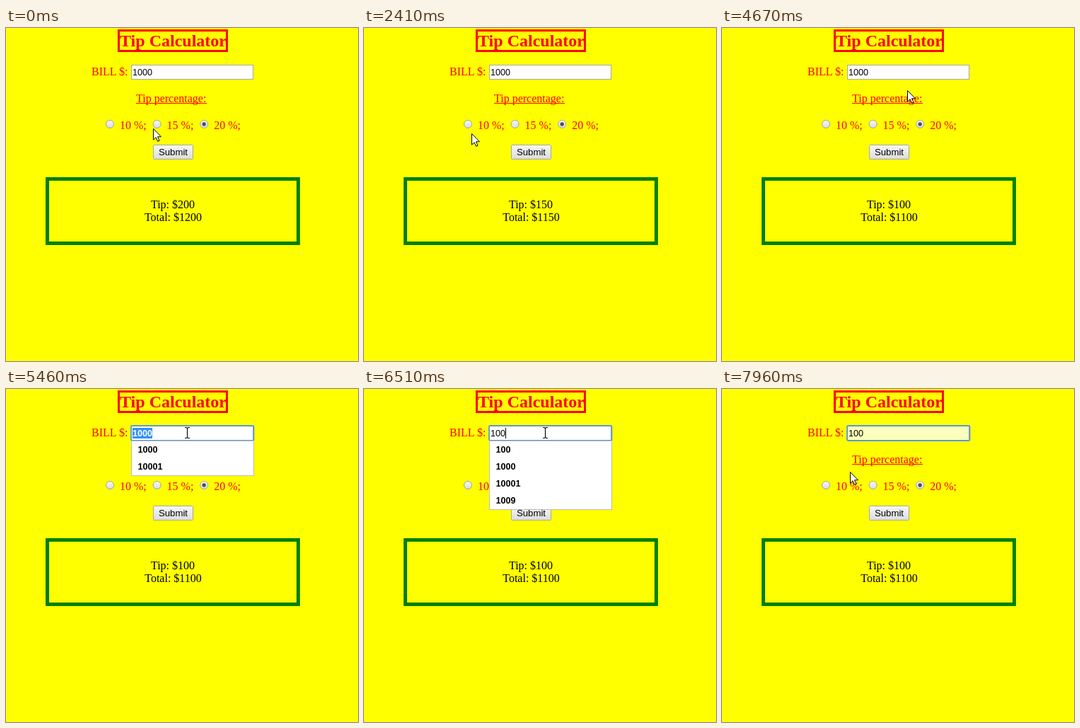
An HTML page for the animation above (8 s loop, 498 by 471 pixels).

```html
<!DOCTYPE html>
<html lang="en">
<head>
<meta charset="utf-8">
<title>Tip Calculator</title>
<style>
  html, body { margin: 0; width: 100%; height: 100%; overflow: hidden; background: #ff0; }
  svg { display: block; }
  .serif { font: 16px "Liberation Serif", serif; }
  .sans { font: 12.6px "Liberation Sans", sans-serif; }
  .red { fill: #f00; }
  .hidden { display: none; }
  #title { font-size: 24px; font-weight: bold; }
  #options text { font-weight: bold; }
</style>
</head>
<body>
<svg width="498" height="471" viewBox="0 0 498 471">
  <defs>
    <linearGradient id="face" x2="0" y2="1">
      <stop stop-color="#f8f8f8"/><stop offset="1" stop-color="#dcdcdc"/>
    </linearGradient>
    <linearGradient id="pressed" x2="0" y2="1">
      <stop stop-color="#dedede"/><stop offset="1" stop-color="#efefef"/>
    </linearGradient>
  </defs>
  <rect width="498" height="471" fill="#ff0"/>

  <g class="serif red">
    <rect x="159.5" y="3.5" width="153" height="29" fill="none" stroke="#f00" stroke-width="3"/>
    <text id="title" x="236.5" y="26" text-anchor="middle">Tip Calculator</text>
    <text x="121" y="67">BILL $:</text>
    <text x="184" y="105">Tip percentage:</text>
    <rect x="184" y="106" width="100" height="1"/>
    <g id="radios"></g>
  </g>

  <rect id="button" x="208.5" y="165.5" width="56" height="20" rx="1" stroke="#a6a6a6"/>
  <text class="sans" x="236.5" y="180" text-anchor="middle" style="font-size:13.2px">Submit</text>

  <rect x="58.5" y="213.5" width="355" height="91" fill="none" stroke="#008000" stroke-width="5"/>
  <g class="serif" text-anchor="middle">
    <text id="tip" x="236" y="255"></text>
    <text id="total" x="236.5" y="273"></text>
  </g>

  <rect id="field" x="177.5" y="52.5" width="172" height="20" stroke="#a9a9a9"/>
  <rect id="ring" x="177" y="52" width="173.5" height="21" rx="1.5" fill="none" stroke="#5c9ad2" stroke-width="1.8"/>
  <rect id="selection" x="179" y="55" width="28" height="15" fill="#3390ff"/>
  <text id="value" class="sans" x="179" y="67"></text>
  <rect id="caret" y="55" width="1" height="15"/>

  <g id="options" class="sans"></g>

  <path id="arrow" d="M.5 .5V16.2L4.1 12.8L6.6 18.3L9 17.3L6.5 11.8H11.4Z" fill="#fff" stroke="#000"/>
  <path id="beam" d="M-3.5 -7.5H-1.5L0 -6.5L1.5 -7.5H3.5M0 -6.5V6.5M-3.5 7.5H-1.5L0 6.5L1.5 7.5H3.5" fill="none" stroke="#000" stroke-width="1.1"/>
</svg>
<script>
const LOOP = 8000;
const RATES = [10, 15, 20];
const DIGIT = 7;
const $ = id => document.getElementById(id);

const at = (x, y) => ({ x, y });
const history = ["100", "1000", "10001", "1009"];
const typed = (value, options) => ({ value, options, selected: false, caret: true });
const result = tip => ({ tip, rate: 20, button: "face" });

const start = {
  x: 208, y: 142, beam: false, rate: 20, tip: 200, button: "face", value: "1000",
  focus: false, selected: false, caret: false, filled: false, options: [], hover: false
};

// Each entry changes part of the state from its time onwards.
const timeline = [
  [140, at(211, 140)],
  [270, at(213, 139)],
  [590, { rate: 15 }],
  [710, at(214, 145)],
  [830, at(217, 158)],
  [950, at(219, 169)],
  [1090, at(222, 174)],
  [1230, at(223, 176)],
  [1390, { button: "pressed" }],
  [1670, result(150)],
  [2170, at(214, 174)],
  [2290, at(182, 163)],
  [2410, at(152, 149)],
  [2540, at(134, 141)],
  [2660, at(141, 138)],
  [2780, at(146, 136)],
  [3180, { rate: 10 }],
  [3330, at(186, 171)],
  [3450, at(204, 179)],
  [3580, at(214, 179)],
  [3710, at(218, 177)],
  [3830, at(220, 176)],
  [3980, { button: "pressed" }],
  [4130, { button: "face" }],
  [4280, result(100)],
  [4420, at(236, 152)],
  [4540, at(264, 108)],
  [4670, at(262, 88)],
  [4790, at(255, 85)],
  [4930, { ...at(256.5, 65), beam: true }],
  [5060, at(256.5, 62)],
  [5310, { focus: true, caret: true }],
  [5460, { selected: true, caret: false, options: history.slice(1, 3) }],
  [6240, typed("1", [...history, "12", "15"])],
  [6380, typed("10", history)],
  [6510, typed("100", history)],
  [7060, { ...at(222, 88), beam: false, caret: false, filled: true, hover: true }],
  [7210, at(223, 89)],
  [7340, at(224, 90)],
  [7590, { options: [], hover: false }],
  [7710, at(212, 98)],
  [7840, at(190, 110)],
  [7960, at(181, 117)]
];

$("radios").innerHTML = RATES.map((rate, i) => {
  const cx = 147 + i * 66.6;
  return `<circle cx="${cx}" cy="136" r="5.5" fill="url(#face)" stroke="#a3a3a3"/>
    <circle class="dot" cx="${cx}" cy="136" r="2.7" fill="#505050"/>
    <text x="${cx + 14}" y="143">${rate} %;</text>`;
}).join("");
const dots = document.querySelectorAll(".dot");

const show = (node, visible) => node.classList.toggle("hidden", !visible);

function optionList({ options, hover }) {
  if (!options.length) return "";
  const rows = options.map((text, i) => `<text x="186.5" y="${90 + i * 24}">${text}</text>`);
  const mark = hover ? '<rect x="178" y="74" width="172" height="24" fill="#cdcdcd"/>' : "";
  return `<rect x="177.5" y="73.5" width="173" height="${options.length * 24 + 1}" fill="#fff" stroke="#bdbdbd"/>`
    + mark + rows.join("");
}

function draw(s) {
  dots.forEach((dot, i) => show(dot, RATES[i] === s.rate));
  $("tip").textContent = `Tip: $${s.tip}`;
  $("total").textContent = `Total: $${1000 + s.tip}`;
  $("button").setAttribute("fill", `url(#${s.button})`);
  $("field").setAttribute("fill", s.filled ? "#faffbd" : "#fff");
  show($("ring"), s.focus);
  show($("selection"), s.selected);
  $("value").textContent = s.value;
  $("value").style.fill = s.selected ? "#fff" : "#000";
  $("value").style.fontWeight = s.selected ? "bold" : "normal";
  $("caret").setAttribute("x", 179 + s.value.length * DIGIT);
  show($("caret"), s.caret);
  $("options").innerHTML = optionList(s);
  show($("arrow"), !s.beam);
  show($("beam"), s.beam);
  $(s.beam ? "beam" : "arrow").setAttribute("transform", `translate(${s.x} ${s.y})`);
}

let origin = null;
let shown = -1;
function tick(now) {
  origin ??= now;
  const time = (now - origin) % LOOP;
  const past = timeline.filter(([from]) => from <= time);
  if (past.length !== shown) {
    shown = past.length;
    draw(Object.assign({}, start, ...past.map(([, change]) => change)));
  }
  requestAnimationFrame(tick);
}
draw(start);
requestAnimationFrame(tick);
</script>
</body>
</html>
```
